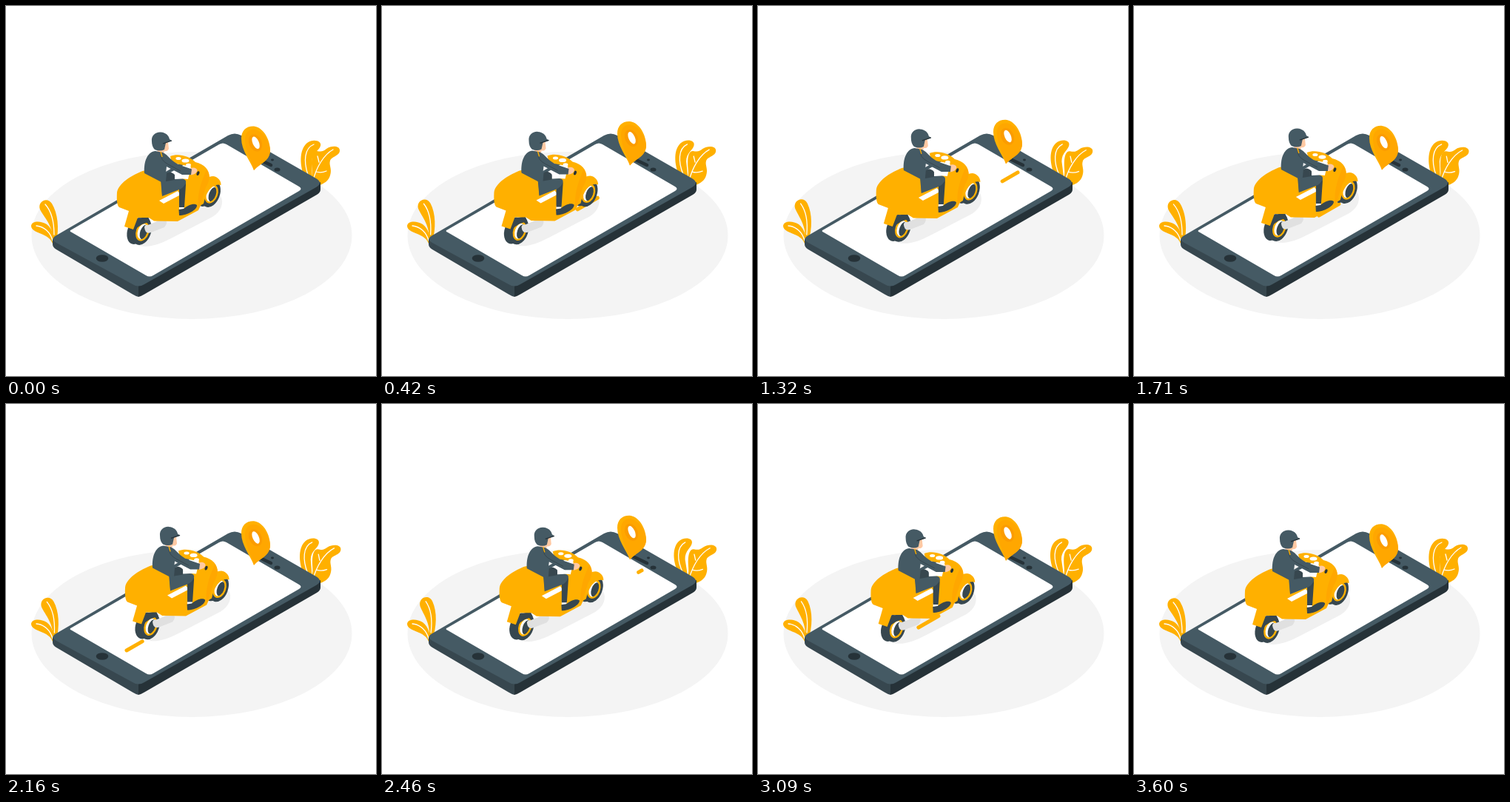
Animation, 500 px wide and 500 px high, one loop 3660 ms. Source, as an HTML page:

```html
<!DOCTYPE html>
<html lang="en">
<head>
<meta charset="utf-8">
<title>Scooter delivery</title>
<style>
  html, body { margin: 0; width: 100%; height: 100%; overflow: hidden; background: #fff; }
  svg { display: block; width: 100%; height: 100%; }
  .y { fill: #ffb000; }
  .o { fill: #ffa700; }
  .amber { fill: #fb9c00; }
  .mid { fill: #455a64; }
  .slate { fill: #37474f; }
  .dark { fill: #263238; }
  .white { fill: #fff; }
  .skin { fill: #ffc9a3; }
  .vein { fill: none; stroke: #fff; stroke-width: 1.3; stroke-linecap: round; }
  .ring { fill: none; stroke: #ffb000; stroke-width: 2.4; }
</style>
</head>
<body>
<svg viewBox="0 0 500 500">
  <defs>
    <g id="wheel">
      <ellipse class="slate" cx="-7" cy="2" rx="12" ry="18.5"/>
      <ellipse class="slate" rx="12.5" ry="19"/>
      <ellipse class="white" cx="1" rx="7.5" ry="12"/>
      <ellipse class="slate" cx="3" rx="5" ry="10"/>
      <ellipse class="ring" cx="1" rx="7.5" ry="12"/>
    </g>
  </defs>
  <ellipse cx="251" cy="310" rx="216.5" ry="113" fill="#f4f4f4"/>

  <!-- plants -->
  <g id="leftLeaf">
    <path class="y" d="M63 318C65 298 51 285 46 275C42 264 56 257 62 267C70 280 72 300 68 319Z"/>
    <path class="vein" d="M53 268C62 278 65 294 65 309"/>
  </g>
  <path class="y" d="M63 321C58 306 34 308 34 297C35 290 47 290 55 295C63 301 65 312 67 321Z"/>
  <path class="vein" d="M41 297C52 298 60 306 63 317"/>
  <g id="backLeaf">
    <path class="y" d="M405 236C396 216 396 194 407 185C415 179 427 182 425 189C423 196 414 198 413 210L414 238Z"/>
    <path class="vein" d="M416 187C403 192 402 210 408 228"/>
  </g>
  <g id="frontLeaf">
    <path class="y" d="M408 241C417 230 413 222 413 212C413 202 415 196 420 196C426 197 428 197 433 193C440 188 451 189 451 195C451 203 440 203 438 209C436 215 441 220 438 229C436 236 430 240 424 242Z"/>
    <path class="vein" d="M442 194C429 201 419 219 415 236M423 211L421 203M419 224Q426 226 433 223"/>
  </g>

  <!-- phone -->
  <path class="dark" d="M179 368L425 238V248Q425 252 420 255L187 389.500Q183 392 179 393Z"/>
  <path class="slate" d="M63 315V322Q63 326 68 329L171 389.500Q175 392 179 393V376Z"/>
  <path class="mid" d="M68 310L300 175Q309 170 318 175L419 233Q429 239 419 245L187 376Q179 381 171 376L68 320Q59 315 68 310Z"/>
  <path class="white" d="M89 302L288 187Q293 184 298 187L396 244Q401 247 396 250L199 364Q194 367 189 364L89 306Q84 304 89 302Z"/>
  <ellipse class="dark" cx="130" cy="341" rx="8.3" ry="4.8"/>
  <path d="M339 206L358 215" stroke="#263238" stroke-width="4.5" stroke-linecap="round"/>
  <ellipse class="dark" cx="360" cy="208" rx="2" ry="1.4"/>
  <ellipse class="dark" cx="366.5" cy="221" rx="4" ry="2.6"/>

  <path id="shadow" fill="#f0f0f0" d="M178 323C190 328 206 323 225 313L279 285C291 278 295 265 290 257L220 270Z"/>
  <line id="dash" stroke="#ffb000" stroke-width="5" stroke-linecap="round"/>

  <g id="scooter">
    <!-- wheels -->
    <use href="#wheel" transform="translate(183.500 304.500) rotate(19)"/>
    <path fill="#e0e0e0" d="M187 299Q188 295 192 296L214 287Q220 292 214 299L196 306Q188 309 187 299Z"/>
    <use href="#wheel" transform="translate(276.500 253.500) rotate(20)"/>
    <path class="y" d="M262 270C262 247 266 230 280 230C287 231 291 237 290.500 242C280 239 271 249 267 267Z"/>

    <!-- body -->
    <path class="slate" d="M176 287L192 285L195 291L184 295L172 303Z"/>
    <path class="y" d="M150 252C152 240 168 230 182 224C192 220 208 222 218 232L246 234L250 217L224 212L222 203C232 199 247 202 256 211C268 214 275 221 275 232C275 250 266 263 260 276L232 291L200 290.500L193 286L178 286L172 302L160 298L166 277L153 272Q149 269 150 252Z"/>
    <path class="o" d="M271 221C276 227 276 236 270 245L262 270L260 274C258 254 263 240 271 221Z"/>
    <g class="white">
      <ellipse cx="233" cy="206" rx="3.6" ry="2"/>
      <ellipse cx="242.500" cy="209" rx="5" ry="2.6"/>
      <ellipse cx="246.500" cy="215" rx="3.4" ry="2.2"/>
      <path d="M226 226L238 226L241 229L238 234L228 235Z"/>
      <path d="M207 263L232 250L236 255L213 267Z"/>
    </g>
    <ellipse class="dark" cx="259.500" cy="226" rx="1.8" ry="3" transform="rotate(20 259 226)"/>

    <!-- rider -->
    <path class="white" d="M234 270H241L240 278L234 279Z"/>
    <path class="slate" d="M233.500 275L240 274C246 269 254 266 258 269C259 275 245 283 234 283Z"/>
    <path class="slate" d="M233 236Q244 234 243 242L241 272H234L234 247Z"/>
    <path class="mid" d="M209 235L238 233.500Q244 234 243 239Q240 246 234 248L211 257Z"/>
    <path class="skin" d="M249 219Q257 217 258.500 222Q258 227 250 228.500Z"/>
    <path class="skin" d="M204 190L219 184L220 193Q218 197 214 196L213 201L205 199Z"/>
    <path class="mid" d="M187 226C186 208 192 197 202 196L212 198C219 201 224 211 235 215L251 220.500L250 228H238L217 217L216 225L228 229V235L215 237L211 257L210 238Z"/>
    <path d="M210 200Q208 208 219 214L236 223" fill="none" stroke="#37474f" stroke-width="1"/>
    <path d="M209 197L211 204" stroke="#ffb000" stroke-width="1.4"/>
    <path class="slate" d="M217 226Q222 222 228 228V235L216 237Z"/>
    <path class="mid" d="M197 183C196 175 202 170 209 170.500C216 171 220 175 221 180L224 182L216 185L214 194Q208 197 201 194Q197 190 197 183Z"/>
    <path d="M212 186L224 182" stroke="#263238" stroke-width="1.3"/>
  </g>

  <g id="pin">
    <path class="y" d="M335 222C330 209 318 195 318 179C318 168 325 162 335 162.500C348 164 357 181 357 195C356 210 344 212 335 222Z"/>
    <path class="o" d="M335 222C333 211 323 196 323 181C323 171 328 167 335 167C347 168 357 183 357 196C356 210 344 212 335 222Z"/>
    <g transform="translate(337 185) rotate(-24)">
      <ellipse class="amber" rx="8.5" ry="12"/>
      <ellipse class="white" cx=".6" rx="4.2" ry="8.8"/>
    </g>
  </g>
</svg>
<script>
const LOOP = 3660;
const el = id => document.getElementById(id);
const move = (id, value) => el(id).setAttribute("transform", value);
// Smooth swing 0 -> 1 -> 0, repeated n times per loop
const swing = (t, n) => (1 - Math.cos(2 * Math.PI * n * t / LOOP)) / 2;

function drawDash(t) {
  const start = 351 - 0.206 * (t % (LOOP / 3));
  const x1 = Math.max(163, start), x2 = Math.min(351, start + 27);
  const y = x => 333 - 0.575 * (x - 163);
  const dash = el("dash");
  dash.style.visibility = x2 - x1 > 2 ? "visible" : "hidden";
  Object.entries({ x1, x2, y1: y(x1), y2: y(x2) })
    .forEach(([name, value]) => dash.setAttribute(name, value));
}

function draw(now) {
  const t = now % LOOP;
  const slow = swing(t, 1), fast = swing(t, 2);
  const ride = `translate(${12 * slow} ${-5 * slow})`;
  move("scooter", ride);
  move("shadow", ride);
  move("pin", `translate(0 ${-15 * fast})`);
  move("leftLeaf", `rotate(${9 * fast} 66 318)`);
  move("backLeaf", `rotate(${-9 * fast} 412 238)`);
  move("frontLeaf", `rotate(${2 * slow} 415 240)`);
  drawDash(t);
}

const origin = performance.now();
function tick() {
  draw(performance.now() - origin);
  requestAnimationFrame(tick);
}
tick();
</script>
</body>
</html>
```
